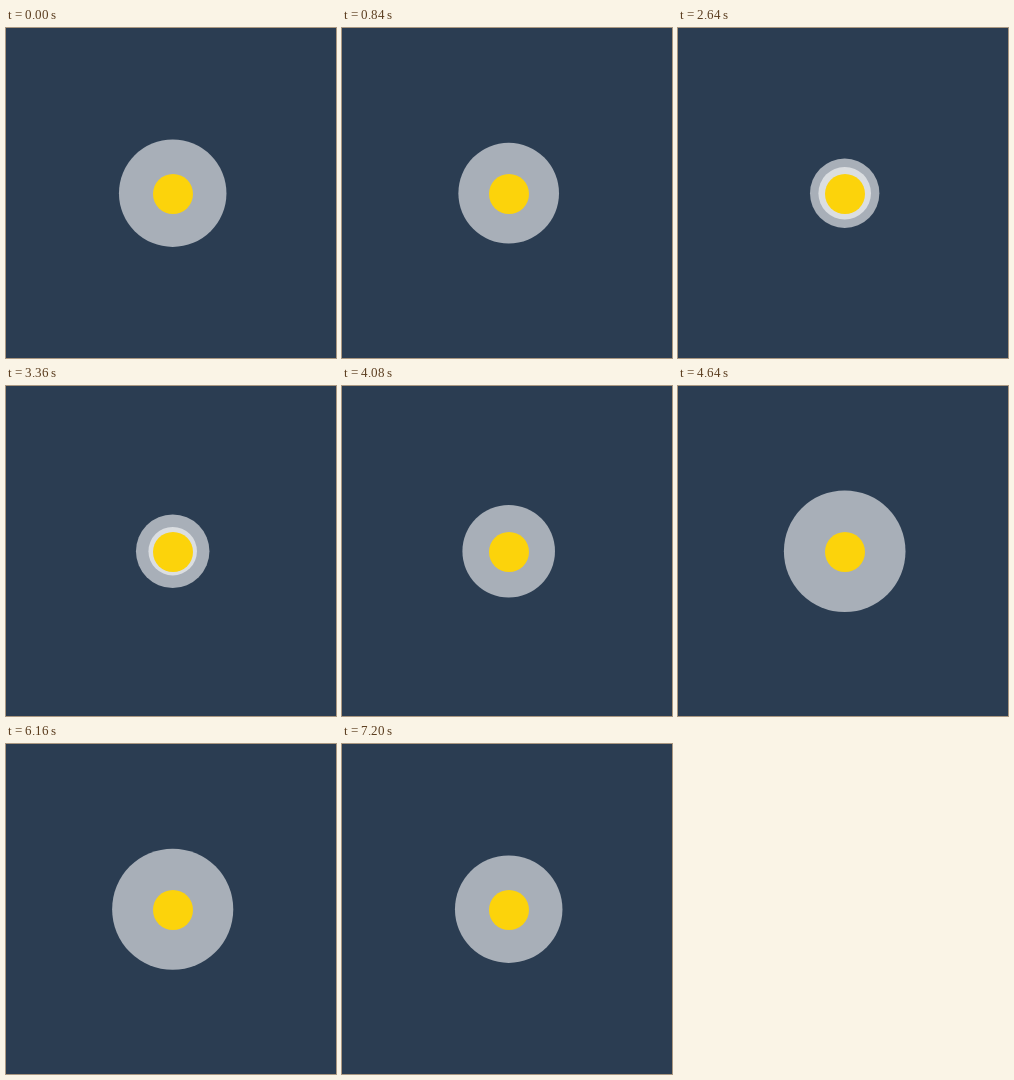
Write an HTML page that moves like this. It is 330 px wide and 330 px high and loops after 7.24 s.

```html
<!DOCTYPE html>
<html lang="en">
<head>
<meta charset="utf-8">
<title>Loading</title>
<style>
  html, body { margin: 0; width: 100%; height: 100%; overflow: hidden; background: #2b3d52; }
  svg { display: block; width: 100vw; height: 100vh; }
  .pulse { fill: #fff; fill-opacity: .59; }
</style>
</head>
<body>
<svg viewBox="0 0 330 330">
  <circle class="pulse" cx="166.7" cy="165.2"/>
  <circle class="pulse" cx="166.7" cy="165.2"/>
  <circle cx="167" cy="166" r="20" fill="#fcd30b"/>
</svg>
<script>
  const LOOP = 7240, STEP = 40;
  const HALF = 800;      // time for one circle to grow fully
  const PHASE = 0.24;    // half-cycles past the first peak at the start
  const RADIUS = 61;
  const pulses = document.querySelectorAll('.pulse');

  // cubic-bezier(.42, 0, .58, 1), solved by bisection
  function easeInOut(x) {
    let lo = 0, hi = 1, u = 0.5;
    for (let i = 0; i < 24; i++) {
      u = (lo + hi) / 2;
      const v = 1 - u;
      const at = 1.26 * u * v * v + 1.74 * u * u * v + u * u * u;
      if (at < x) lo = u; else hi = u;
    }
    return u * u * (3 - 2 * u);
  }

  function draw(now) {
    const time = Math.floor((now % LOOP) / STEP) * STEP;
    const phase = time / HALF + PHASE;
    pulses.forEach((pulse, i) => {
      const growth = Math.abs((phase + i) % 2 - 1);
      pulse.setAttribute('r', (RADIUS * easeInOut(growth)).toFixed(2));
    });
  }

  const start = performance.now();
  function tick() {
    draw(performance.now() - start);
    requestAnimationFrame(tick);
  }
  tick();
</script>
</body>
</html>
```
